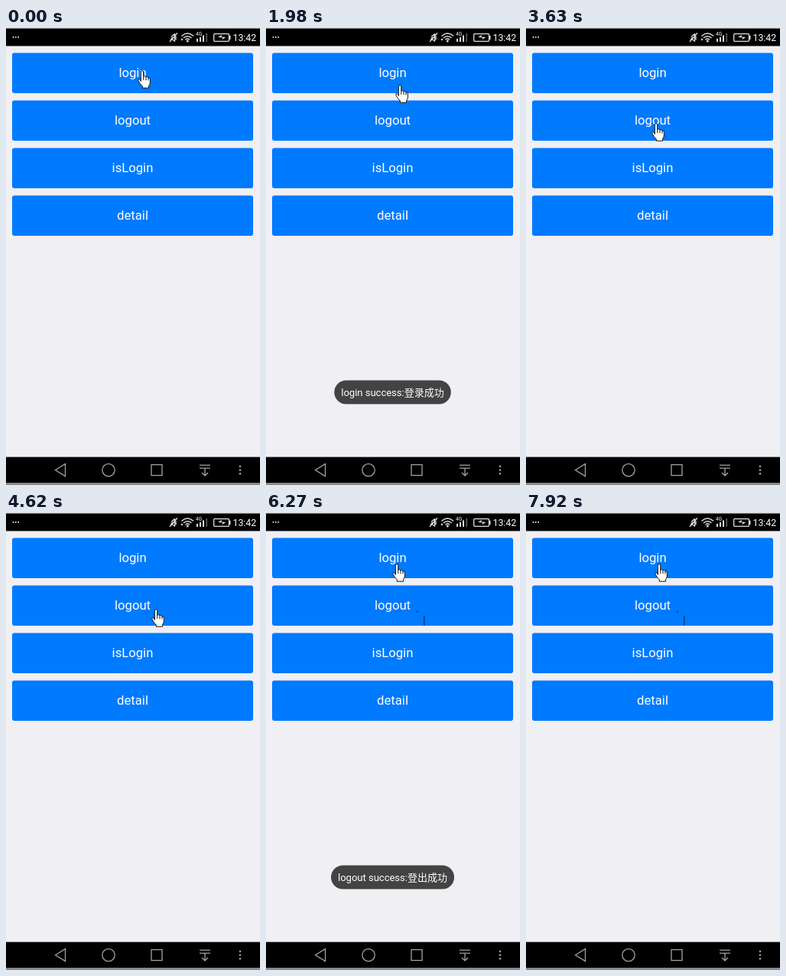
Recreate the animation shown at these times as an HTML page. Size 332 by 596 pixels, loop 8 s.

```html
<!DOCTYPE html>
<html lang="en">
<head>
<meta charset="utf-8">
<title>Login demo</title>
<style>
  html, body { margin: 0; width: 100%; height: 100%; overflow: hidden; background: #f0eff4; }
  svg { display: block; width: 332px; height: 596px; font-family: Roboto, "Noto Sans CJK SC", "Noto Sans CJK", sans-serif; }
  text { fill: #fff; }
  .mid { text-anchor: middle; }
  .line { fill: none; stroke: #ddd; stroke-width: 1.3; }
  .nav { fill: none; stroke: #a2a2a2; stroke-width: 1.3; }
</style>
</head>
<body>
<svg viewBox="0 0 332 596">
  <rect width="332" height="596" fill="#f0eff4"/>

  <!-- status bar -->
  <rect width="332" height="23.5"/>
  <rect width="332" height="1" fill="#858585"/>
  <g fill="#ddd">
    <circle cx="9.5" cy="12" r="1"/><circle cx="12.8" cy="12" r="1"/><circle cx="16.1" cy="12" r="1"/>
    <path d="M249 14h2v4h-2zM253 12h2v6h-2zM257 9.5h2v8.5h-2z"/>
    <path d="M261.5 7h1.5v11h-1.5z" fill="#666"/>
    <path d="M277 12l5-3-.5 2.5 6 .5-5 3 .5-2.5z"/>
    <path d="M292 10h1.5v5h-1.5z"/>
    <circle cx="237.3" cy="17" r="1.5"/>
    <path id="traffic" d="M228.5 14h3l-1.5 3z"/>
  </g>
  <g class="line">
    <path d="M215 15.5l2-2.2v-3l3.5-2.3v9l-3-2M214 18L224 6.5M222 10.5v5"/>
    <path d="M229.5 10.5q7.8-7 15.6 0M232 13q5.3-4.6 10.6 0M234.5 15.2q2.8-2.4 5.6 0" stroke-width="1.5"/>
    <rect x="271.7" y="7.7" width="19.8" height="9.6" rx="1"/>
  </g>
  <text x="248" y="9.5" font-size="6.5">4G</text>
  <text x="296.5" y="17" font-size="12.3">13:42</text>

  <g id="buttons"></g>
  <path id="ghost" d="M206 134h1.5v13h-1.5zM197 127.5h2v2h-2z" fill="#123d72"/>

  <g id="toast">
    <rect id="pill" y="459.5" height="31" rx="15.5" fill="#434344"/>
    <text id="message" class="mid" x="165.5" y="480" font-size="13"></text>
  </g>

  <!-- navigation bar -->
  <rect y="559.5" width="332" height="34"/>
  <rect y="593.5" width="332" height="2.5" fill="#8c8a8a"/>
  <g class="nav">
    <path d="M64.5 576.5L77.5 568.5V584.5Z"/>
    <circle cx="134" cy="576.5" r="8.2"/>
    <rect x="190" y="569.5" width="14" height="14"/>
    <path d="M253 570.2h14M253 574.2h14M260 574.5v9M256 580l4 3.8 4-3.8"/>
  </g>
  <g fill="#a2a2a2">
    <circle cx="306" cy="571.8" r="1.3"/><circle cx="306" cy="576.5" r="1.3"/><circle cx="306" cy="581.2" r="1.3"/>
  </g>

  <!-- hand pointer, fingertip at (0, 0) -->
  <g id="hand" stroke="#111" stroke-linejoin="round" stroke-linecap="round">
    <path fill="#fff" d="M-1.6 14V2.2Q-1.6.6 0 .6T1.7 2.2V8.2Q3.5 6.8 5 8.8Q6.8 7.8 8 9.8Q10.3 9.2 10.4 11.8V16Q10.3 18.5 8.6 20.5V23.2H.3V21Q-3 18-5.3 13.2Q-5.4 11.2-3.6 11.6Z"/>
    <path fill="none" d="M1.7 8.5v4M5 9v3.8M8 10v3"/>
  </g>
</svg>
<script>
const $ = id => document.getElementById(id);
const LOOP = 8000;

// Each row holds from its time until the next: [ms, x, y]
const moves = [
  [0, 178, 55], [330, 177, 55], [660, 176, 63], [990, 175, 74],
  [2310, 184, 170], [2640, 169, 145], [2970, 170, 124],
  [4290, 190, 124], [4620, 196, 125], [5280, 195, 125],
  [5610, 189, 82], [5940, 183, 70], [6270, 171, 66], [7590, 170, 66], [7920, 174, 66]
];
const login = ["login success:登录成功", 152.5];
const logout = ["logout success:登出成功", 161];
// [ms, opacity, message]
const toasts = [
  [0, 0, login], [1650, .6, login], [1980, 1, login], [3630, 0, login],
  [4950, .6, logout], [5280, 1, logout], [6930, .62, logout], [7260, 0, logout]
];

const at = (rows, t) => rows.findLast(row => row[0] <= t);

$("buttons").innerHTML = ["login", "logout", "isLogin", "detail"].map((label, i) => `
  <rect x="8" y="${32.5 + 62 * i}" width="315" height="52.5" rx="3" fill="#007aff"/>
  <text class="mid" x="165.5" y="${64 + 62 * i}" font-size="16.7">${label}</text>`).join("");

function draw(now) {
  const t = now % LOOP;
  const [, x, y] = at(moves, t);
  const [, opacity, [message, width]] = at(toasts, t);
  $("hand").setAttribute("transform", `translate(${x} ${y})`);
  $("toast").setAttribute("opacity", opacity);
  $("pill").setAttribute("x", 165.5 - width / 2);
  $("pill").setAttribute("width", width);
  $("message").textContent = message;
  $("ghost").setAttribute("opacity", t >= 5610 ? 1 : 0);
  $("traffic").setAttribute("opacity", t < 6600 ? 1 : 0);
  requestAnimationFrame(draw);
}
draw(0);
</script>
</body>
</html>
```
